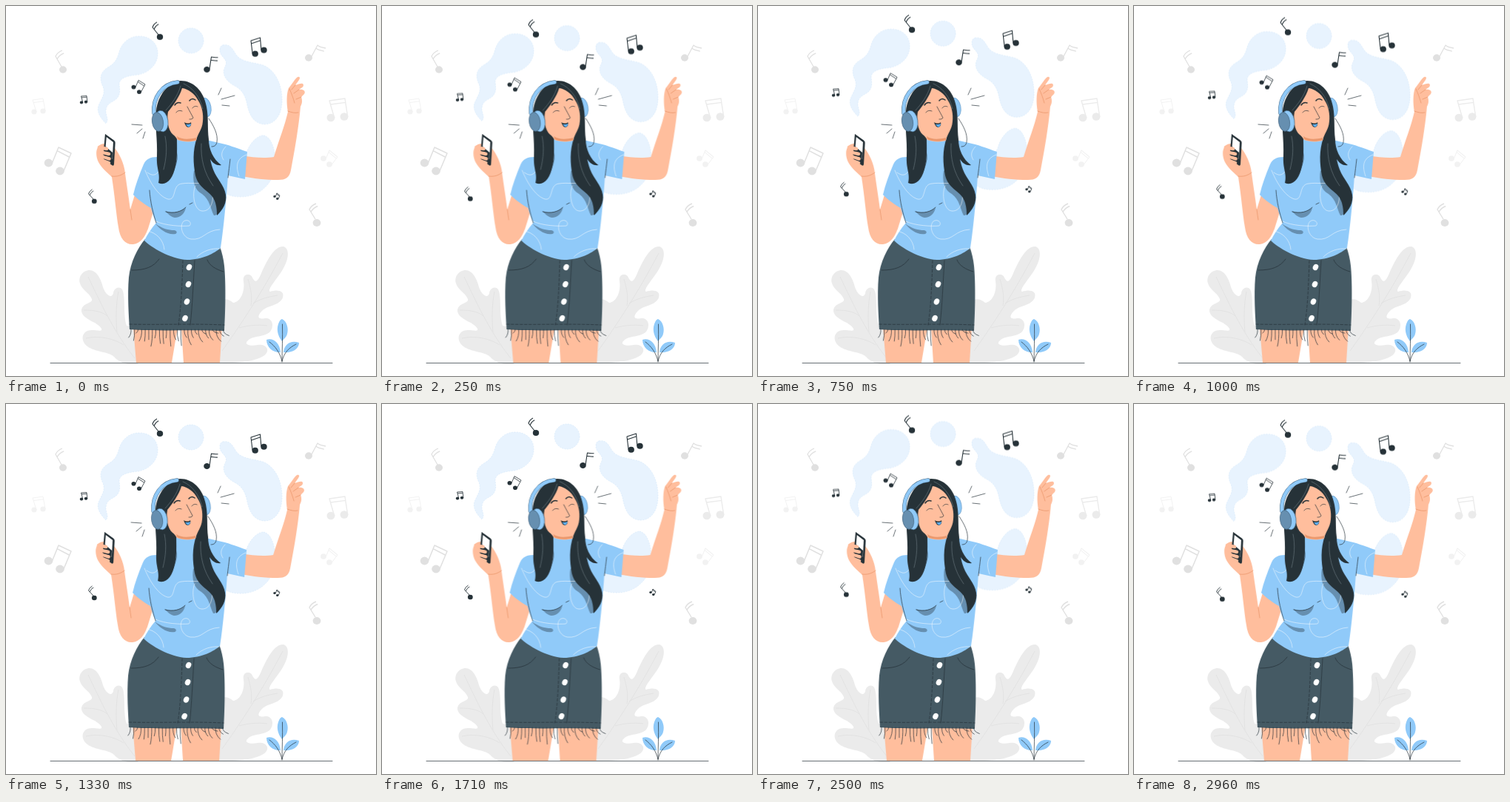
An HTML page for the animation above (3000 ms loop, 500x500 px).

```html
<!DOCTYPE html>
<html lang="en">
<head>
<meta charset="utf-8">
<title>Dancing to music</title>
<style>
  html, body { margin: 0; width: 100%; height: 100%; overflow: hidden; background: #fff; }
  svg { display: block; width: 100vw; height: 100vh; }
  .skin { fill: #ffbe9d; }
  .blue { fill: #90caf9; }
  .dark { fill: #263238; }
  .shade { fill: #668fb0; }
  .line, .crease, .thread, .band { fill: none; stroke-linecap: round; stroke-linejoin: round; }
  .line { stroke: #263238; stroke-width: .7; }
  .crease { stroke: #eb996e; stroke-width: .8; }
  .thread { stroke: #fff; stroke-width: .8; opacity: .65; }
  .blob { fill: #e8f3fe; stroke: #d3e7fa; stroke-width: .6; stroke-dasharray: 2 1.5; }
  .leaf { fill: #ebebeb; }
  .vein { fill: none; stroke: #e0e0e0; stroke-width: .8; }
</style>
</head>
<body>
<svg viewBox="0 0 500 500">
  <!-- foliage -->
  <path class="leaf" d="M113 357C104 357 97 366 100 375C103 384 113 388 116 396C118 402 102 401 102 412C103 424 125 427 129 436C131 442 118 436 110 439C101 443 102 454 110 460C121 468 139 467 146 474C154 483 165 485 178 484L200 440L163 432C158 418 162 392 157 383C153 378 146 381 145 388C143 396 135 391 131 380C128 368 122 357 113 357Z"/>
  <path class="vein" d="M111 366C125 395 145 440 174 476M105 411C120 411 130 413 137 419M108 449C125 445 145 449 159 458M152 386C149 400 148 420 150 441"/>
  <path class="leaf" d="M375 325C384 328 382 343 374 356C367 368 352 384 357 386C366 383 377 384 374 394C370 405 354 404 346 412C338 420 341 424 350 422C360 421 363 432 357 440C349 448 334 445 327 452C320 458 331 460 340 458C350 456 356 463 352 469C345 479 320 483 285 482L285 402C292 393 302 396 307 401C317 400 323 386 321 372C319 362 330 360 333 367C337 376 341 371 345 361C353 343 363 324 375 325Z"/>
  <path class="vein" d="M374 334C352 376 325 420 292 466M367 391C354 393 343 396 334 402M353 432C340 430 325 432 315 435M327 369C331 384 333 392 331 405"/>

  <g id="still"></g>

  <g id="floating">
    <path class="blob" d="M135 159C129 153 122 144 125 135C129 125 135 119 131 109C126 99 127 89 138 83C148 77 150 72 153 62C157 49 167 41 180 41C196 41 206 52 205 66C204 80 193 90 179 93C165 94 154 97 153 105C153 112 156 119 149 126C142 131 136 132 135 141C134 148 140 153 135 159Z"/>
    <circle class="blob" cx="250" cy="47" r="17"/>
    <path class="blob" d="M293 53C303 51 306 58 311 66C318 76 333 76 347 80C363 86 373 105 373 127C373 147 364 160 349 160C335 159 329 148 326 134C323 118 317 112 307 107C297 101 291 92 296 82C302 72 289 70 289 60C289 56 290 54 293 53Z"/>
    <path class="blob" d="M348 175C359 177 364 195 364 212C364 236 346 258 317 258C292 258 286 245 292 230C300 215 318 214 324 202C327 189 338 175 348 175Z"/>
  </g>

  <!-- sprout -->
  <path class="blue" d="M373 423C380 426 382 437 380 443C379 448 375 450 373 453C369 448 366 441 367 434C368 428 370 424 373 423ZM352 451C361 448 370 455 371 468C362 469 352 462 352 451ZM375 468C376 456 386 451 396 455C396 464 386 469 375 468Z"/>
  <path class="line" d="M373.500 430C374 448 373 466 373 481M356 454C364 460 370 468 373 480M392 457C382 462 376 468 373 480"/>

  <g id="dancer">
    <!-- right side cup sits behind the hair -->
    <ellipse class="blue" cx="270" cy="137" rx="7" ry="13" transform="rotate(-10 270 137)" stroke="#5f96c4" stroke-width=".7"/>

    <!-- legs -->
    <path class="skin" d="M172 434L176 482H224L232 434ZM237 434L240 482H289L292 434Z"/>

    <!-- phone arm -->
    <path class="skin" d="M124 191C121 197 122 205 125 211C130 220 138 226 143 231C147 256 149 282 152 299C154 315 162 323 172 322C182 321 188 312 192 301L201 272L175 252L168 275C166 259 163 241 161 226C160 213 153 199 147 192L135 186C130 186 126 187 124 191Z"/>
    <path class="crease" d="M143 230C150 231 156 229 161 225M168 275L170 289"/>
    <path class="dark" d="M134 173Q133 172 135.500 174L146 181.500Q148 183 147.700 185L146 214Q145.500 217 143 215L132.500 207Q131 206 131.300 203Z"/>
    <path fill="#fff" d="M135.800 177L145 184L143.800 207L133.800 200Z"/>
    <path class="dark" d="M133.500 189L144 198L143.500 209L133 203Z"/>
    <g class="band" stroke="#ffbe9d" stroke-width="4.600">
      <path d="M126 191L136 193M128 197L139 200M129 203L139.500 206.500M131 209L139 212"/>
    </g>
    <path class="line" d="M133 196L140 196.500M133 202L141 203.500M133 207L141 210"/>

    <!-- raised arm -->
    <path class="skin" d="M318 202C335 205 350 206 362 204C369 181 377 161 381 143C379 132 379 118 382 111C387 105 390 99 394 96C397 95 398 97 396 100L391 107C396 105 402 103 402 107C402 110 398 111 396 113C401 112 406 115 403 119L399 123C401 128 400 132 398 136C396 161 390 196 385 222C383 232 378 235 368 235C350 235 335 233 318 230Z"/>
    <path class="crease" d="M391 107L386 113M396 113L389 118M399 123L392 126M383 112C386 118 388 124 390 131M381 142C386 144 391 145 395 144"/>

    <!-- skirt -->
    <path fill="#455a64" d="M188 315C178 327 168 346 166 367C164 391 166 418 167 437C210 440 252 437 295 439C297 405 297 371 295 351C294 342 292 333 289 325Z"/>
    <g class="line">
      <path d="M170 357C188 357 199 353 207 342M272 343C275 351 284 356 294 359M255 344C253 376 252 405 249 431"/>
      <path stroke-dasharray="3.500 2.500" d="M239 344C238 375 237 405 233 431M167 430C210 431 252 429 295 431"/>
    </g>
    <g id="buttons" fill="#fff"></g>
    <path id="fringe" class="line"/>

    <!-- shirt -->
    <path class="blue" d="M204 204C195 204 189 207 186 214C180 228 175 242 172 255C180 263 189 269 196 273C198 281 201 288 203 293C196 301 191 309 187 317C196 326 222 342 245 343C265 343 282 334 290 327C293 310 298 261 300 229L323 234L326 197C312 192 299 187 288 185L258 178H230Z"/>
    <path class="shade" d="M215 277C226 281 237 278 243 272C242 280 236 286 228 286C223 285 219 281 215 277ZM202 294C211 301 220 303 227 303C231 303 232 307 229 308C219 310 208 302 202 294ZM254 222C252 236 254 248 265 254C276 262 276 274 281 283C285 284 290 276 290 270Z"/>
    <path class="line" d="M194 249C195 265 199 281 203 293M303 207C302 216 301 223 300 232M216 278C227 281 237 278 243 272M248 268L252 266"/>
    <path class="thread" d="M188 222C193 235 205 257 219 261C231 263 224 241 238 240C250 238 260 242 270 237M191 225C198 230 202 229 206 224M256 243C251 253 254 276 265 277C277 278 281 263 279 252M203 291C215 297 238 298 248 297C252 293 246 287 240 291C234 297 238 313 250 315C267 317 269 303 289 302M191 304C203 306 213 316 214 329M258 339C266 331 278 327 289 328M325 201C314 205 309 213 315 230M297 190C291 196 290 202 294 208"/>

    <!-- hair behind the face -->
    <path class="dark" d="M236 101C220 103 205 120 203 142C201 162 205 180 204 203C203 221 209 226 206 239C216 244 226 234 229 216C232 203 231 190 231 178L258 178C252 196 253 212 256 229C261 249 279 250 283 266C285 273 285 278 285 283C293 276 299 265 297 255C295 242 285 234 280 221C278 216 277 211 276 207C280 213 285 216 291 215C280 207 274 194 274 180C272 164 274 152 271 136C267 114 253 101 236 101Z"/>

    <!-- face -->
    <path class="skin" d="M238 111C235 122 225 136 219 143C217 154 219 168 226 174C230 177 231 180 232 181C240 184 250 184 257 182C259 172 265 168 266 156C267 146 265 136 260 128C255 118 246 112 238 111Z"/>
    <path fill="#eb996e" d="M231 176C238 181 248 180 257 178L257 181C248 184 238 183 232 180Z"/>
    <path class="line" stroke-width="1" d="M230 144C232 141 235 141 238 142M252 138C254 135 257 135 259 136M245 136C248 142 251 147 253 151C252 153 250 153 248 153"/>
    <path class="band" stroke="#263238" stroke-width="1.500" d="M228 134C230 131 233 130 236 131M248 128C250 125 253 125 256 127"/>
    <path class="dark" d="M241 157C244 159 248 159 250 157C251 161 249 164 246 164C243 163 242 160 241 157Z"/>
    <path fill="#5eaef0" d="M243 160C246 160 248 160 250 159C250 162 248 164 246 163.500Z"/>
    <path class="band" stroke="#718087" stroke-width=".6" d="M236 108C232 122 224 132 216 141M240 105C252 110 262 122 266 139M215 176C218 190 217 205 213 221M264 186C263 205 267 225 280 243"/>

    <!-- headphones and cable -->
    <path class="band" stroke="#42647e" stroke-width="5.400" d="M200 145C198 124 211 105 232 103"/>
    <path class="band" stroke="#90caf9" stroke-width="4.400" d="M200 145C198 124 211 105 232 103"/>
    <g transform="rotate(-9 208 156)" stroke="#42647e" stroke-width=".7">
      <ellipse class="blue" cx="210.500" cy="156" rx="8.500" ry="14.500"/>
      <ellipse class="shade" cx="205" cy="156" rx="7.500" ry="13"/>
    </g>
    <path class="line" d="M217 168C226 180 232 194 231 207C230 214 228 219 226 224M274 152C280 161 287 173 285 184C284 189 281 190 278 190"/>

    <path class="line" d="M170 160L184 161M177 172L184 166M185 179L188 170M287 120L291 111M291 126L309 121M292 134L302 135"/>
  </g>

  <path class="line" d="M60 482.500H441"/>
</svg>
<script>
  const $ = id => document.getElementById(id);
  const INK = '#263238';

  const draw = (d, color, r, heads) =>
    heads.map(([x, y]) => `<ellipse cx="${x}" cy="${y}" rx="${r}" ry="${r * .94}" fill="${color}"/>`).join('') +
    `<path d="${d}" fill="none" stroke="${color}" stroke-width="${Math.max(.8, r * .26)}" stroke-linejoin="round"/>`;

  // head, radius, stem foot, stem tip, flag vector
  const single = (color, x, y, r, fx, fy, tx, ty, dx, dy) => {
    const mx = tx + (fx - tx) * .27, my = ty + (fy - ty) * .27;
    const flag = `q${dx * .25} ${dy * .65} ${dx} ${dy}`;
    return draw(`M${fx} ${fy}L${tx} ${ty}${flag}M${mx} ${my}${flag}`, color, r, [[x, y]]);
  };

  // two heads, radius, side of the stems, two stem tips
  const pair = (color, x1, y1, x2, y2, r, side, ax, ay, bx, by) => {
    const s = r * .85 * side, k = .22;
    const mid = (tx, ty, x, y) => `${tx + (x + s - tx) * k} ${ty + (y - ty) * k}`;
    return draw(`M${x1 + s} ${y1}L${ax} ${ay}L${bx} ${by}L${x2 + s} ${y2}` +
      `M${mid(ax, ay, x1, y1)}L${mid(bx, by, x2, y2)}`, color, r, [[x1, y1], [x2, y2]]);
  };

  $('still').innerHTML =
    single('#e0e0e0', 77, 86, 5, 75, 82, 67, 68, 9, -8) +
    single('#e0e0e0', 409, 70, 5, 413, 68, 421, 53, 11, 4) +
    single('#e0e0e0', 420, 293, 5.4, 418, 288, 410, 275, 9, -8) +
    pair('#e0e0e0', 57.5, 212, 73, 223, 5.8, 1, 71, 191, 88, 199) +
    pair('#ebebeb', 439, 151, 457, 149.5, 5.5, 1, 437, 128, 458, 125) +
    pair('#f2f2f2', 38, 143, 50, 142, 3.6, 1, 36, 127, 50, 125) +
    pair('#f2f2f2', 429, 206, 437, 214, 3.9, 1, 437, 195, 448, 204);

  $('floating').innerHTML +=
    single(INK, 208, 42, 4.2, 206, 39, 198, 29, 6, -7) +
    single(INK, 271.5, 86, 4.3, 275, 85, 277.5, 69, 9, .8) +
    single(INK, 119.3, 264, 3.4, 118, 261, 111.5, 254, 5, -6) +
    pair(INK, 336.7, 64.8, 348.5, 59.8, 4.2, -1, 331, 47, 343.5, 43) +
    pair(INK, 172.5, 109.8, 180, 116.3, 3, 1, 179, 100.5, 188, 106) +
    pair(INK, 102, 130.5, 108, 129.8, 2.2, 1, 101.5, 122, 109, 121.5) +
    pair(INK, 363, 257.5, 366.7, 260.5, 1.7, 1, 366, 253, 370, 256.3);

  $('buttons').innerHTML = [[247.5, 353], [246.5, 376], [244.5, 399.5], [242, 422]]
    .map(([x, y]) => `<ellipse cx="${x}" cy="${y}" rx="3.600" ry="4.300" transform="rotate(25 ${x} ${y})"/>`).join('');

  let fringe = '';
  for (let i = 0; i < 27; i++) {
    const x = 169 + i * 4.8;
    const len = 13 + 6 * Math.sin(i * 2.4) + (i > 3 && i < 17 ? 4 : -2);
    const lean = (i - 8) * .4 + 1.5 * Math.sin(i * 1.7);
    fringe += `M${x} 437q${-lean * .2} ${len * .6} ${lean} ${len}`;
  }
  $('fringe').setAttribute('d', fringe);

  const timing = { duration: 1500, iterations: Infinity, delay: -15 };
  const sway = [0, -1, 2, -4, 4, -4, 4, -4, 2, -1, 0];
  const lift = [0, -10, 0];
  $('dancer').animate(sway.map(x => ({ transform: `translate(${x}px, 0px)` })), timing);
  $('floating').animate(lift.map(y => ({ transform: `translate(0px, ${y}px)` })), timing);
</script>
</body>
</html>
```
